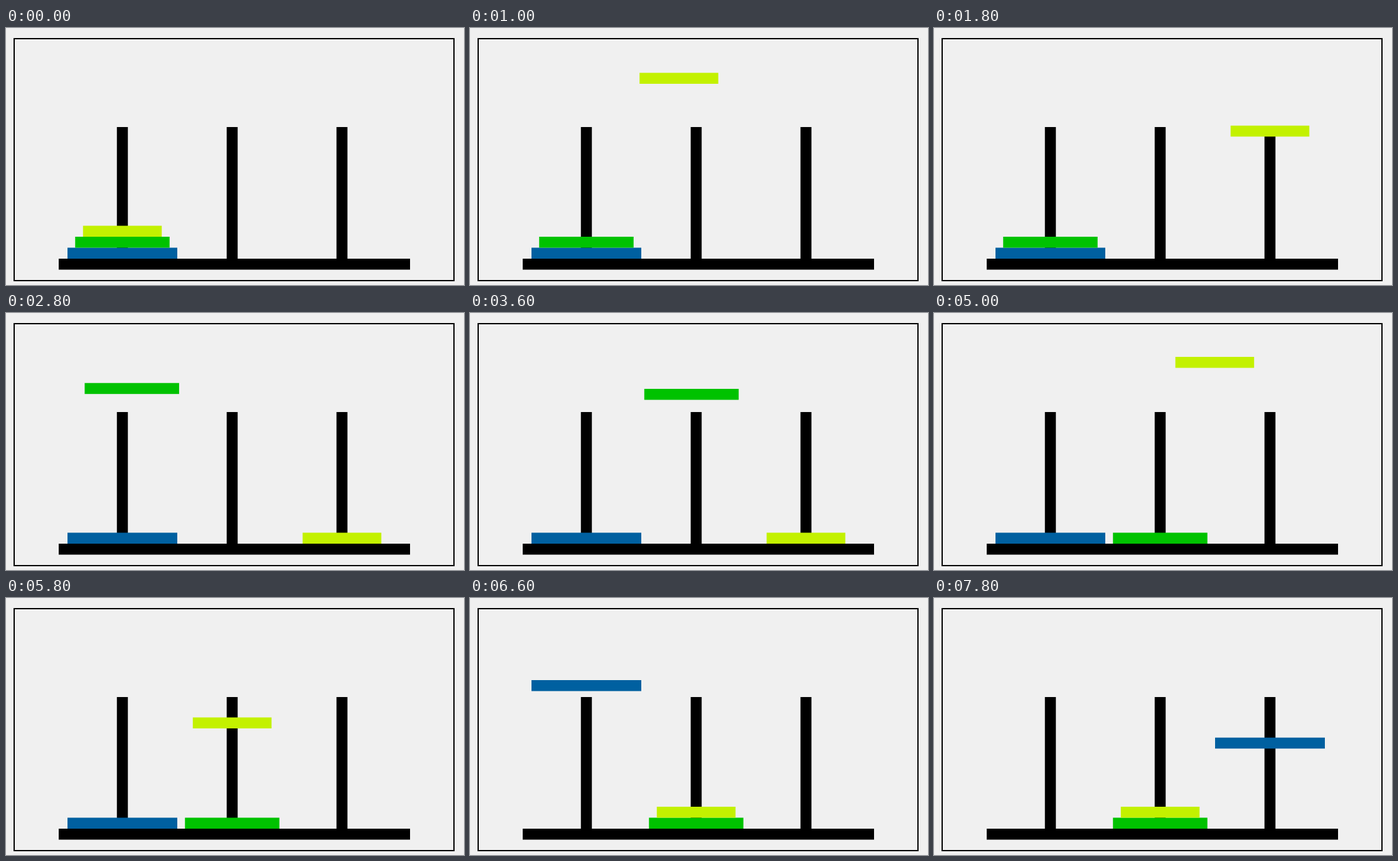
Write an HTML page that moves like this. It is 730x410 px and loops after 8000 ms.

```html
<!DOCTYPE html>
<html lang="en">
<head>
<meta charset="utf-8">
<title>Tower of discs</title>
<style>
  html, body { margin: 0; width: 100%; height: 100%; overflow: hidden; background: #f0f0f0; }
  svg { display: block; width: 730px; height: 410px; }
</style>
</head>
<body>
<svg viewBox="0 0 730 410">
  <rect x="13" y="17" width="701" height="386" fill="none" stroke="#000" stroke-width="2"/>
  <rect x="84" y="368" width="560" height="17.5"/>
  <g id="pegs"></g>
  <g id="discs"></g>
</svg>
<script>
const LOOP = 8000, TICK = 200;
const PEGS = [185.5, 360.5, 535.5];
const THICK = 17.5, FLOOR = 368, HOVER = 131, ARC = 61, LIFT = 280;

const discs = [
  { width: 175, color: '#0060a0', level: 0 },
  { width: 150.5, color: '#00c200', level: 1 },
  { width: 125.5, color: '#c3f100', level: 2 }
];

// Each move rises until `leave`, arcs to the other peg until `arrive`, then drops.
const moves = [
  { disc: 2, from: 0, to: 2, fromLevel: 2, toLevel: 0, leave: 648, arrive: 1706 },
  { disc: 1, from: 0, to: 1, fromLevel: 1, toLevel: 0, leave: 2722, arrive: 3762 },
  { disc: 2, from: 2, to: 1, fromLevel: 0, toLevel: 1, leave: 4578, arrive: 5648 },
  { disc: 0, from: 0, to: 2, fromLevel: 0, toLevel: 0, leave: 6600, arrive: 7619 }
];

function addRect(parent, attrs) {
  const rect = document.createElementNS('http://www.w3.org/2000/svg', 'rect');
  for (const name in attrs) rect.setAttribute(name, attrs[name]);
  return document.getElementById(parent).appendChild(rect);
}

const restY = level => FLOOR - THICK * (level + 1);
const lerp = (a, b, u) => a + (b - a) * u;
const glide = p => p * (1.1 + p * (0.8 - 0.9 * p));

function movePosition(move, time) {
  const { leave, arrive } = move;
  if (time < leave) {
    const p = Math.min(1, (leave - time) / LIFT);
    return { x: PEGS[move.from], y: lerp(HOVER, restY(move.fromLevel), p * p) };
  }
  if (time < arrive) {
    const u = glide((time - leave) / (arrive - leave));
    return { x: lerp(PEGS[move.from], PEGS[move.to], u), y: HOVER - ARC * 4 * u * (1 - u) };
  }
  const p = Math.min(1, (time - arrive) / LIFT);
  return { x: PEGS[move.to], y: lerp(HOVER, restY(move.toLevel), p * p) };
}

function discPosition(index, time) {
  let position = { x: PEGS[0], y: restY(discs[index].level) };
  for (const move of moves) {
    if (move.disc === index && time >= move.leave - LIFT) position = movePosition(move, time);
  }
  return position;
}

for (const x of PEGS) addRect('pegs', { x: x - THICK / 2, y: 158, width: THICK, height: 210 });
for (const disc of discs) {
  disc.rect = addRect('discs', { width: disc.width, height: THICK, fill: disc.color });
}

function draw(time) {
  discs.forEach((disc, index) => {
    const { x, y } = discPosition(index, time);
    disc.rect.setAttribute('x', x - disc.width / 2);
    disc.rect.setAttribute('y', y);
  });
}

function frame() {
  const time = performance.now() % LOOP;
  draw(Math.floor(time / TICK) * TICK);
  requestAnimationFrame(frame);
}

draw(0);
requestAnimationFrame(frame);
</script>
</body>
</html>
```
